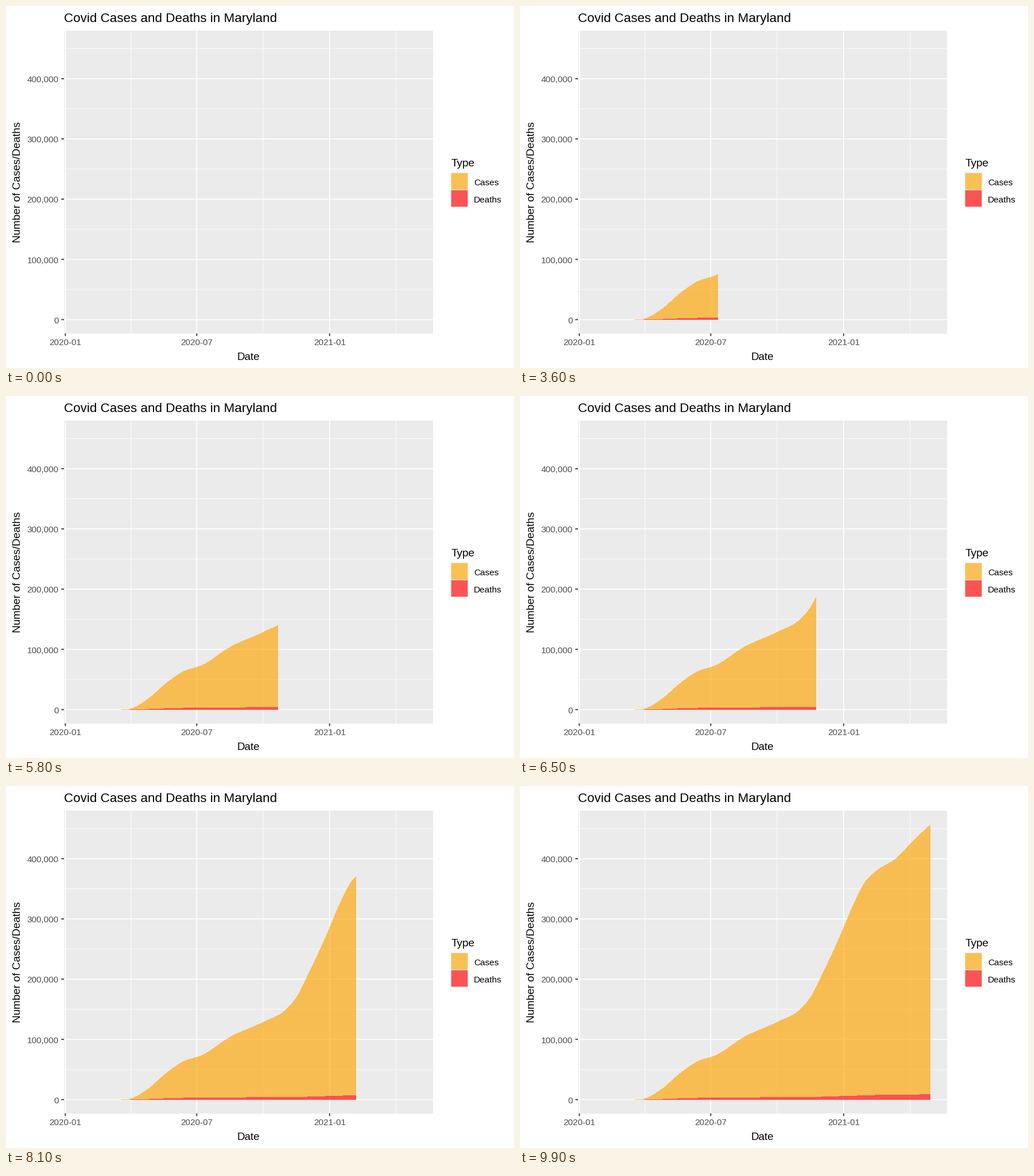
A matplotlib script that plays this animation: 885x632 px, repeating every 10000 ms.

```python
import numpy as np
import matplotlib.pyplot as plt
from matplotlib.animation import FuncAnimation
from matplotlib.patches import Polygon, Rectangle

W, H, DPI = 885, 632, 64
PT = 72 / DPI                          # points per pixel
FRAMES, INTERVAL = 100, 100

LEFT, RIGHT, TOP, BOTTOM = 101, 744, 43, 572
X0, PX_DAY = 103.4, 1.2578             # 1 Jan 2020, pixels per day
Y0, PX_K = 547.5, 480 / 456.5          # zero line, pixels per thousand
FIRST_DAY, LAST_DAY = 21, 486          # days since 1 Jan 2020
FIRST_COL = 200
ALPHA = 0.65

# Turning points of the cumulative curves: (day, thousands)
TOTAL = [(77, 0.1), (86, 0.6), (95, 3.7), (115, 18.7), (141, 45.4),
         (162, 62.6), (190, 74.4), (227, 103.3), (274, 129), (305, 149.4),
         (319, 168.4), (338, 212.5), (361, 272), (380, 325.5), (396, 362),
         (410, 378.6), (439, 401.2), (465, 433.3), (486, 456.5)]
DEATHS = [(84, 0), (100, 0.2), (121, 1.2), (152, 2.55), (182, 3.2),
          (274, 3.95), (319, 4.3), (366, 5.95), (410, 7.6), (486, 8.75)]


def smooth(x, points):
    """Cubic Hermite curve through the points."""
    px, py = np.array(points, float).T
    x = np.clip(x, px[0], px[-1])
    slope = np.gradient(py, px)
    k = np.clip(np.searchsorted(px, x) - 1, 0, len(px) - 2)
    step = px[k + 1] - px[k]
    t = (x - px[k]) / step
    ease = t * t * (3 - 2 * t)
    bend = t * (1 - t) * ((1 - t) * slope[k] - t * slope[k + 1])
    return py[k] + (py[k + 1] - py[k]) * ease + step * bend


def day_x(day):
    return X0 + PX_DAY * day


def value_y(thousands):
    return Y0 - PX_K * thousands


def top_rows(thousands):
    """Hard pixel rows for the upper edge of an area."""
    h = PX_K * thousands
    return np.where(h > 0.06, np.ceil(Y0 - 0.5 - h), Y0 + 0.5)


cols = np.arange(FIRST_COL, 715)
days = (cols + 0.5 - X0) / PX_DAY
base = np.full(len(cols), Y0 + 0.5)
death_top = top_rows(smooth(days, DEATHS))
total_top = top_rows(smooth(days, TOTAL))

plt.rcParams["font.family"] = "Liberation Sans"
fig = plt.figure(figsize=(W / DPI, H / DPI), dpi=DPI, facecolor="white")
ax = fig.add_axes([0, 0, 1, 1])
ax.set_xlim(0, W)
ax.set_ylim(H, 0)
ax.axis("off")


def line(xs, ys, color, width):
    ax.plot(xs, ys, color=color, lw=width * PT, snap=False,
            solid_capstyle="butt")


def label(x, y, text, size, color="black", **kw):
    ax.text(x, y, text, fontsize=size * PT, color=color,
            va="baseline", **kw)


def box(x, y, w, h, color, alpha=1):
    ax.add_patch(Rectangle((x, y), w, h, fc=color, ec="none", alpha=alpha,
                           snap=False))


def grid_x(day, width):
    line([day_x(day)] * 2, [TOP, BOTTOM], "white", width)


def grid_y(value, width):
    line([LEFT, RIGHT], [value_y(value)] * 2, "white", width)


# Panel, grid and axes
box(LEFT, TOP, RIGHT - LEFT, BOTTOM - TOP, "#EBEBEB")
for day in (91, 274, 458):
    grid_x(day, 0.9)
for value in range(50, 500, 100):
    grid_y(value, 0.9)

for day, name in ((0, "2020-01"), (182, "2020-07"), (366, "2021-01")):
    grid_x(day, 1.8)
    line([day_x(day)] * 2, [BOTTOM - 0.5, BOTTOM + 4.2], "#333333", 1.8)
    label(day_x(day), 592.5, name, 15.3, "#4D4D4D", ha="center")
for value in range(0, 500, 100):
    y = value_y(value)
    grid_y(value, 1.8)
    line([LEFT - 4.7, LEFT], [y, y], "#333333", 1.8)
    label(91.8, y + 6.2, f"{value * 1000:,}", 15.3, "#4D4D4D", ha="right")

label(101, 28, "Covid Cases and Deaths in Maryland", 22.4)
label(422, 618, "Date", 18.8, ha="center")
label(25, 307.5, "Number of Cases/Deaths", 18.9, ha="center",
      rotation=90, rotation_mode="anchor")

# Legend
label(775.5, 280, "Type", 19)
box(775, 291, 30, 60, "#F2F2F2")
for y, name, color in ((291.6, "Cases", "orange"), (321.6, "Deaths", "red")):
    box(775.6, y, 28.8, 28.8, color, ALPHA)
    label(815, y + 21.4, name, 15.4)


def area(color):
    patch = Polygon([(0, 0), (0, 0), (0, 0)], fc=color, ec="none",
                    alpha=ALPHA, zorder=3, snap=False)
    return ax.add_patch(patch)


cases_area, deaths_area = area("orange"), area("red")


def steps(top, bottom, n):
    """Outline of n pixel-wide columns."""
    xs = np.repeat(np.arange(FIRST_COL, FIRST_COL + n + 1), 2)[1:-1]
    upper = np.column_stack([xs, np.repeat(top[:n], 2)])
    lower = np.column_stack([xs, np.repeat(bottom[:n], 2)])
    return np.vstack([upper, lower[::-1]])


def update(i):
    span = LAST_DAY - FIRST_DAY
    day = min(LAST_DAY, np.floor(FIRST_DAY + span * (i + 0.5) / (FRAMES - 1)))
    n = int(np.sum(cols + 0.5 < day_x(day)))
    for patch, top, bottom in ((cases_area, total_top, death_top),
                               (deaths_area, death_top, base)):
        patch.set_visible(n > 0)
        if n:
            patch.set_xy(steps(top, bottom, n))
    return cases_area, deaths_area


anim = FuncAnimation(fig, update, frames=FRAMES, interval=INTERVAL,
                     init_func=lambda: update(0), repeat=True, repeat_delay=0)
plt.show()
```
